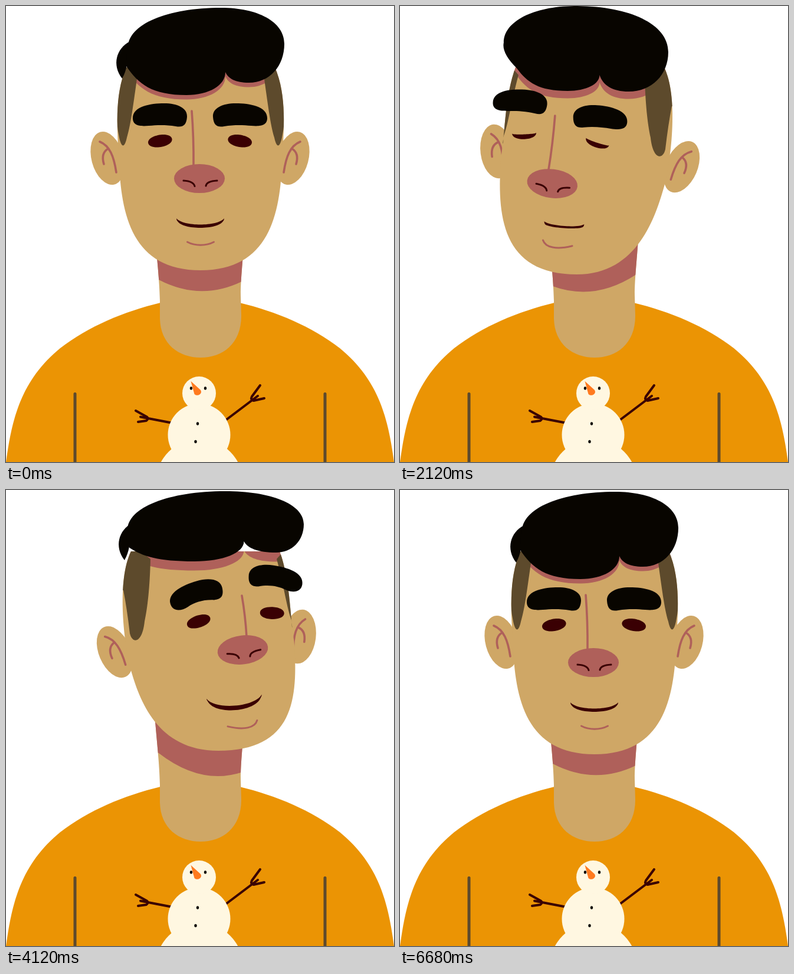
These frames come from a looping animation (658 px wide and 773 px high, 7240 ms). An HTML page with a canvas:

```html
<!DOCTYPE html>
<html>
<head>
<meta charset="utf-8">
<title>Head turn</title>
<style>
html, body { margin: 0; width: 100%; height: 100%; overflow: hidden; background: #fff; }
canvas { display: block; }
</style>
</head>
<body>
<canvas id="stage" width="658" height="773"></canvas>
<script>
const ctx = document.getElementById('stage').getContext('2d');
const LOOP = 7240, STEP = 40, LAG = 100, MID = 329;
const SKIN = '#cfa766', BLUSH = '#af605a', DARK = '#3a0003', BLACK = '#080500',
      BROWN = '#5d4a2c', SHIRT = '#eb9404', SNOW = '#fff7e1', CARROT = '#ff7a1f';

// Motion: every value is a sum of eased moves.
function ramp(t, from, to) {
  const u = Math.min(1, Math.max(0, (t - from) / (to - from)));
  return u < .5 ? 4 * u ** 3 : 1 - 4 * (1 - u) ** 3;
}
const turnAt = t => -1.03 * ramp(t, 1380, 2290) + 2.03 * ramp(t, 3080, 4150)
  - 1.5 * ramp(t, 4410, 5650) + .5 * ramp(t, 5760, 6595);
const smileAt = t => -ramp(t, 1320, 2100) + 2 * ramp(t, 2700, 3800) - ramp(t, 5860, 6690);
const raiseAt = t => ramp(t, 520, 1100) - ramp(t, 1240, 1960) + ramp(t, 3360, 4000) - ramp(t, 5760, 6560);
const lidAt = t => ramp(t, 0, 120) - ramp(t, 160, 280) + ramp(t, 1120, 1280) - ramp(t, 3400, 3680);

// Where a point of the face goes for turn p: shift by depth, nod, roll and squeeze.
function rig(p, x, y, depth, nod, lift, roll = 0, squeeze = 0) {
  const a = Math.abs(p), off = x - MID;
  return [x + depth * p + (2 - squeeze * off) * a, y + nod * p + lift * a - roll * off * p];
}

const asPath = shape => typeof shape === 'string' ? new Path2D(shape) : shape;

function fill(shape, color) {
  ctx.fillStyle = color;
  ctx.fill(asPath(shape));
}

function stroke(shape, color, width) {
  ctx.strokeStyle = color;
  ctx.lineWidth = width;
  ctx.lineCap = ctx.lineJoin = 'round';
  ctx.stroke(asPath(shape));
}

function oval(x, y, rx, ry, color, deg = 0) {
  const path = new Path2D();
  path.ellipse(x, y, rx, ry, deg * Math.PI / 180, 0, 7);
  fill(path, color);
}

function place([x, y], deg, side, draw) {
  ctx.save();
  ctx.translate(x, y);
  ctx.rotate(deg * Math.PI / 180);
  ctx.scale(side, 1);
  draw();
  ctx.restore();
}

function clipped(path, draw) {
  ctx.save();
  ctx.clip(path);
  draw();
  ctx.restore();
}

function snowman() {
  stroke('M280 706.5L228 696.5M220 686L238 696Q243 699 238 703L224 705', DARK, 4);
  stroke('M372 702.5L427 661M431 643L417 662Q414 668 420 669L438 665', DARK, 4);
  oval(328, 808, 74, 74, SNOW);
  oval(327.5, 727, 53, 53, SNOW);
  oval(327.5, 656.5, 28.5, 28.5, SNOW);
  for (const [x, y] of [[314, 648], [338, 648], [325, 708], [321.5, 738.5]]) oval(x, y, 2.2, 2.7, BLACK);
  fill('M313.5 636L330 651C334 657 325 663 319.5 658Z', CARROT);
}

function body(p) {
  for (const side of [1, -1]) place([MID, 0], 0, side, () => {
    fill('M-1 503H67C129 518 189 543 237 580C304 635 319 700 329 773H-1Z', SHIRT);
    stroke('M212 657.5V780', BROWN, 5);
  });
  snowman();
  const neck = new Path2D('M252 380C256 430 260 460 261 500V530C262 573 293 596 330 596C367 596 399 573 399 525L398 490C398 460 402 430 405 380Z');
  fill(neck, SKIN);
  const left = 464 - 14.5 * p - 3.5 * Math.abs(p), right = 467 + 11.5 * p;
  clipped(neck, () => fill(`M240 370V${left - 4}L259 ${left}Q330 501 400 ${right}L420 ${right - 4}V370Z`, BLUSH));
}

// One half of the skull, from temple to jaw; k > 0 when the head turns to this side.
function skullHalf(side, p, jaw) {
  const k = side * p, cheek = 260 - 24 * k + 20 * k * k;
  return [
    [126 + 8 * k, 104], [147 + 5 * k, 152], [141 + 10 * k, cheek - 48], [138.5 + 20 * k, cheek],
    [135 + 31 * k, 355], [116 + 42 * k, jaw]
  ].map(([x, y]) => [MID + 1 + side * x, y]);
}

function skullPath(p) {
  const jaw = 448 - 6.5 * p + Math.abs(p) / 2;
  const pts = [...skullHalf(-1, p, jaw), [330 + 30 * p, jaw], ...skullHalf(1, p, jaw).reverse()];
  return new Path2D(`M${pts[0]}C${pts.slice(1).join(' ')}Z`);
}

// Hair: quarter arcs between the extremes of each curl.
function hairPath(p) {
  const a = Math.abs(p), path = new Path2D();
  let x = 204 + 5.5 * p, y = 102 - 4 * p;
  path.moveTo(x, y);
  const fall = (x2, y2, lean) => {
    path.bezierCurveTo(x + lean * (x2 - x), y + .62 * (y2 - y), x2 - .57 * (x2 - x), y2, x2, y2);
    [x, y] = [x2, y2];
  };
  const swing = (x2, y2) => {
    path.bezierCurveTo(x + .58 * (x2 - x), y, x2, y2 - .58 * (y2 - y), x2, y2);
    [x, y] = [x2, y2];
  };
  fall(306 + 17.5 * p - 4 * a, 151 - 11.5 * p - 18.5 * a, .2);
  swing(372 + 32.5 * p - a, 112 - 15 * p - 10 * a);
  fall(412 + 35 * p + 11 * a, 130 - 19.5 * p - 4.5 * a, .12);
  swing(472 + 25 * p + 8 * a, 64 - 10 * p + 4 * a);
  fall(365 + 37 * p - 30 * a, 3 + p - 2 * a, 0);
  swing(207 + 15 * p - 16 * a, 70 + 3 * p - 5 * a);
  path.quadraticCurveTo(x - 4, y + 18, 204 + 5.5 * p, 102 - 4 * p);
  return path;
}

function sideHair(side, p) {
  const k = side * p, tip = 241 - 12 * k + 8 * k * k;
  const top = 107 + 22 * k, inner = 114 + 28 * k, low = 125 + 30 * k, outer = 138 + 18 * k;
  place([MID + 1, 0], 0, side, () => fill(
    `M${top} 117C${inner} 165 ${inner + 4} 200 ${low} 223` +
    `C${low + 4} ${tip} ${outer - 4} ${tip} ${outer} ${tip - 18}` +
    `Q${outer + 5} 200 ${143 + 12 * k} 170H230V0Z`, BROWN));
}

function ear() {
  oval(0, 0, 27, 46, SKIN, -15);
  stroke('M-13-28C4-21 11-3 15 24M1-16C-9-10-9 0-6 10', BLUSH, 3.6);
}

function eye(lid) {
  const k = -13.7 + 16.5 * lid;
  ctx.rotate(-10 * Math.PI / 180);
  fill(`M-20.5 0C-20.5 13.7 20.5 13.7 20.5 0C20.5 ${k}-20.5 ${k}-20.5 0Z`, DARK);
}

function brow(raise) {
  ctx.translate(0, -5 * raise);
  ctx.rotate(-12 * raise * Math.PI / 180);
  const sag = 16 - 3 * raise;
  fill(`M-46 5C-46-15-16-20 7-20S47-12 46 3 38 21 27 19C9 ${sag}-6 ${sag + 1}-19 18S-46 19-46 5Z`, BLACK);
}

function nose(p) {
  const a = Math.abs(p), [x, y] = rig(p, 328, 292.5, 71.5, -15, -6.5);
  const topX = 315 + 68.5 * p + 16.5 * a, topY = 178 - 3.5 * p + 4.5 * a;
  const endX = x - 10 + 6.5 * p + 10 * a, endY = y - 22.5;
  stroke(`M${topX} ${topY}Q${(topX + endX) / 2 + 2} ${(topY + endY) / 2} ${endX} ${endY}`, BLUSH, 3.6);
  place([x, y], -7 * p, 1, () => {
    oval(0, 0, 43, 24.5, BLUSH);
    stroke('M-27 3.5Q-10 4.5-8 13M30 3.5Q12 4.5 11 12.5', DARK, 3);
  });
}

function mouth(q, smile) {
  const a = Math.abs(q), w = 40.5 + 6.5 * smile, d = 16 + 7 * smile, c = w * .72;
  const low = (d - 5) / 3, high = (d - 4 * (5.5 + 2 * smile)) / 3;
  ctx.save();
  ctx.translate(0, 5.5 * Math.max(smile, 0));
  place(rig(q, 329.5, 376, 58, -4.5, -4), -4.5 * q, 1, () => fill(
    `M${-w} ${-d}Q${-w} ${3 - d} ${2 - w} ${5 - d}C${-c} ${low} ${c} ${low} ${w - 2} ${5 - d}` +
    `Q${w} ${3 - d} ${w} ${-d}C${c} ${high} ${-c} ${high} ${-w} ${-d}Z`, DARK));
  place(rig(q, 330, 400, 70, -6, -4), -12 * q, 1, () => {
    const half = 22.5 + 3 * a, dip = 7 + 5 * a;
    stroke(`M${-half} 0C${10 * q - 9.5} ${dip} ${10 * q + 9.5} ${dip} ${half} 0`, BLUSH, 3);
  });
  ctx.restore();
}

function head(t, p) {
  const tilt = -8 * p, sides = [-1, 1];
  for (const s of sides) place(rig(p, MID + 157 * s, 258, 10.5, 1, 2.5, .083), tilt, -s, ear);

  const skull = skullPath(p), hair = hairPath(p);
  fill(skull, SKIN);
  clipped(skull, () => {
    place([0, 7.5 + (p < 0 ? -5 : 8) * p], 0, 1, () => fill(hair, BLUSH));
    for (const s of sides) sideHair(s, p);
  });

  // The back lobe slips behind the fringe as the head goes left.
  const hide = Math.min(1, Math.max(0, -p / .15)), near = 4 * Math.max(0, p);
  place([near + 20 * hide, -near - 35 * hide], 0, 1,
    () => fill('M210 60C187 72 179 100 197 123Q203 112 205 100Z', BLACK));
  fill(hair, BLACK);

  for (const s of sides) {
    place(rig(p, MID + 67.7 * s, 228.7, 58, -3.5, -9.5, .105, .08), tilt, -s, () => eye(lidAt(t)));
    place(rig(p, MID + 68 * s, 185, 59, -4, -14, .2), -4 * p, -s, () => brow(raiseAt(t)));
  }
  nose(p);
  mouth(turnAt(t - LAG), smileAt(t));
}

function render(t) {
  const p = turnAt(t);
  ctx.fillStyle = '#fff';
  ctx.fillRect(0, 0, 658, 773);
  body(p);
  head(t, p);
}

const start = performance.now();
function tick() {
  const t = (performance.now() - start) % LOOP;
  render(Math.floor(t / STEP) * STEP);
  requestAnimationFrame(tick);
}
tick();
</script>
</body>
</html>
```
